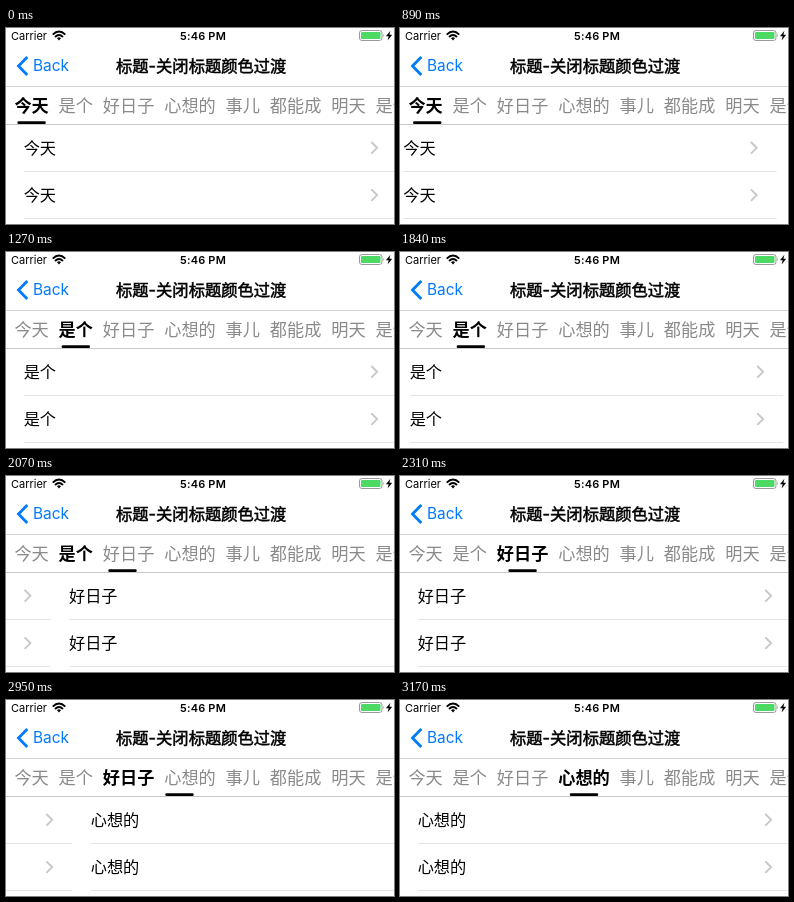
Write an HTML page that moves like this. It is 388 by 196 pixels and loops after 4.04 s.

```html
<!DOCTYPE html>
<html lang="zh-CN">
<head>
<meta charset="utf-8">
<style>
  html, body { margin: 0; width: 100%; height: 100%; overflow: hidden; background: #fff; }
  svg { display: block; width: 388px; height: 196px; }
  text { font-family: Inter, "Noto Sans CJK SC", "Noto Sans CJK", sans-serif; }
  .status { font-size: 11px; }
  .bold { font-weight: 600; }
  .title { font-size: 16.3px; stroke: #000; stroke-width: .5; }
  .tab { font-size: 17.2px; fill: #8a8a8a; }
  .tab.on { font-weight: 600; fill: #000; }
  .row { font-size: 16.2px; }
  .line { fill: none; stroke-width: 1.9; }
</style>
</head>
<body>
<svg viewBox="0 0 388 196">
  <text class="status" x="5" y="12">Carrier</text>
  <g class="line" stroke="#000">
    <path d="M46.7 6.6Q53 .6 59.3 6.6M49 9Q53 5.2 57 9"/>
    <path d="M51 10.2Q53 8.4 55 10.2L53 12.4Z" fill="#000" stroke="none"/>
  </g>
  <text class="status bold" x="197" y="12" text-anchor="middle" letter-spacing=".2">5:46 PM</text>
  <rect x="353.5" y="2.5" width="22.5" height="10" rx="2.5" fill="#fff" stroke="#999"/>
  <rect x="355" y="4" width="19.5" height="7" rx="1.2" fill="#4cd964"/>
  <path d="M377 5.7q1.6 1.8 0 3.6z" fill="#999"/>
  <path d="M384.4 2.8L380 8.2h2.7l-1.1 4.2 4.6-5.6h-2.8z"/>

  <path class="line" d="M21.3 29L12.5 38l8.8 9" stroke="#007aff" style="stroke-width:2.8"/>
  <text x="27" y="43.3" font-size="15.4" fill="#007aff">Back</text>
  <text class="title" x="195.2" y="43.8" text-anchor="middle">标题-关闭标题颜色过渡</text>
  <rect y="58" width="388" height="1" fill="#d4d4d4"/>

  <g id="tabs"></g>
  <rect y="96" width="388" height="1" fill="#c8c8c8"/>
  <rect id="bar" y="93.2" width="28.4" height="2.8" rx="1.2"/>
  <g id="pages"></g>
</svg>
<script>
const LOOP = 4040;
const PAGE = 392, ROW = 47.3, TOP = 96;   // pages are a little wider than the stage
const EM = 17.2, GAP = 9.8;
const labels = ['今天', '是个', '好日子', '心想的', '事儿', '都能成', '明天', '是个'];

const swipes = [
  { start: 890, duration: 380, nudge: .036 },
  { start: 1840, duration: 470, nudge: .02 },
  { start: 2780, duration: 390, nudge: .03 }
];

const $ = id => document.getElementById(id);
function add(parent, tag, attrs, text = '') {
  const el = document.createElementNS('http://www.w3.org/2000/svg', tag);
  for (const key in attrs) el.setAttribute(key, attrs[key]);
  el.textContent = text;
  return parent.appendChild(el);
}

let x = 8.4;
const centers = [];
const tabs = labels.map(label => {
  const width = label.length * EM;
  const tab = add($('tabs'), 'text', { x, y: 83.5, class: 'tab' }, label);
  centers.push(x + width / 2);
  x += width + GAP;
  return tab;
});

labels.slice(0, 4).forEach((label, i) => {
  const page = add($('pages'), 'g', { transform: `translate(${i * PAGE})` });
  for (const y of [TOP, TOP + ROW]) {
    add(page, 'text', { x: 17.7, y: y + 29.7, class: 'row' }, label);
    add(page, 'path', { d: `M365.3 ${y + 18}l5.8 5.8l-5.8 5.8`, class: 'line', stroke: '#c7c7cc' });
    add(page, 'rect', { x: 18, y: Math.floor(y + ROW), width: PAGE - 19, height: 1, fill: '#e5e5e7' });
  }
});

// A drag that speeds up, then a long glide to rest
const glide = u => 1 - (1 - u ** 1.5) ** 5.06;

// Scroll position in pages
function positionAt(time) {
  return swipes.reduce((sum, { start, duration, nudge }) => {
    if (time < start) return sum;
    const u = Math.min((time - start) / duration, 1);
    return sum + (u < 1 ? Math.min(nudge + (1 - nudge) * glide(u), .998) : 1);
  }, 0);
}

function draw(time) {
  const position = positionAt(time);
  const page = Math.floor(position);
  const center = centers[page] + (centers[page + 1] - centers[page]) * (position - page);
  $('pages').setAttribute('transform', `translate(${-position * PAGE})`);
  $('bar').setAttribute('x', center - 14.2);
  tabs.forEach((tab, i) => tab.classList.toggle('on', i === page));
}

const begin = performance.now();
function tick() {
  draw((performance.now() - begin) % LOOP);
  requestAnimationFrame(tick);
}
tick();
</script>
</body>
</html>
```
